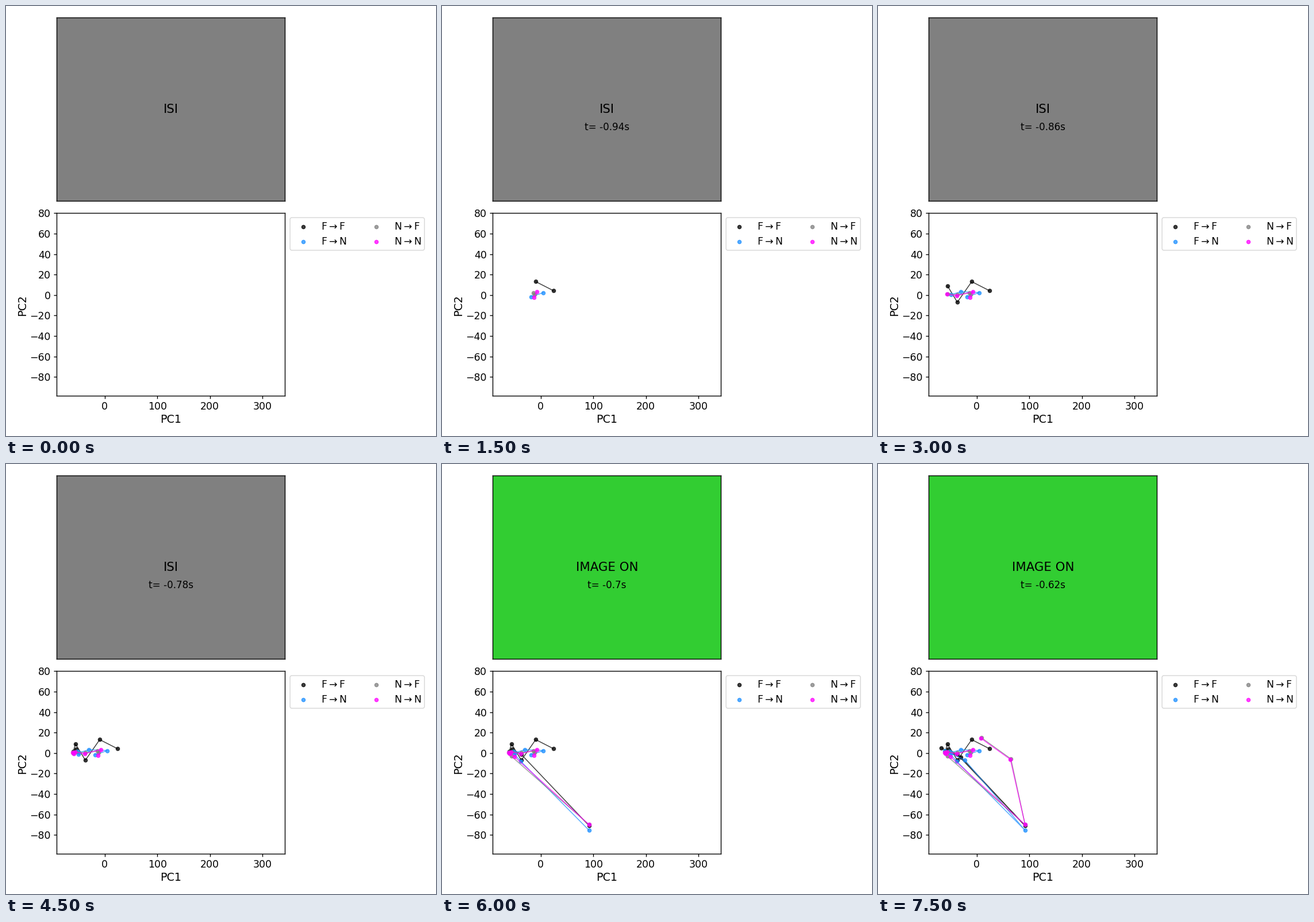
Write a matplotlib script that moves like this. It is 748 px wide and 748 px high and loops after 8000 ms.

```python
import matplotlib.pyplot as plt
import numpy as np
from matplotlib.animation import FuncAnimation
from matplotlib.patches import FancyBboxPatch

SIZE = 748
INTERVAL = 250
FRAMES = 32
HOLD = 3          # frames per time step
ONSET = 7         # step at which the image appears
ALPHA = 0.75

# Where the response goes after its peak, relative to the resting point
RETURN = {"F": [(31, -8), (-7, 1)], "N": [(126, -6.6), (70, 14)]}


def trajectory(first, start, second, rest, zigzag, pull):
    """Settle to rest in a damped zigzag, drift off, peak and return."""
    i = np.arange(5)
    late = (np.maximum(i - 2, 0) / 2) ** 2
    x = rest[0] + 24 * 0.22 ** i + pull[0] * late
    y = rest[1] + zigzag * (-0.45) ** i + pull[1] * late
    peak = (92, pull[1] - 66)
    back = np.add(rest, RETURN[first])
    return np.vstack([start, second, np.column_stack([x, y]), peak, back])


CONDITIONS = [
    ("F", "F", "black", dict(start=(24.8, 4.1), second=(-9.6, 13.1),
                             rest=(-61, 4), zigzag=-11, pull=(24, -5))),
    ("F", "N", "dodgerblue", dict(start=(-18.9, -1.8), second=(5.1, 2.4),
                                  rest=(-54, 1.3), zigzag=2, pull=(16, -9.5))),
    ("N", "F", "gray", dict(start=(-11.3, 0.5), second=(-14, 1.9),
                            rest=(-61, 0.9), zigzag=-0.7, pull=(5, -4))),
    ("N", "N", "magenta", dict(start=(-12.4, -2.6), second=(-6.9, 3.5),
                               rest=(-62, 0.4), zigzag=-1, pull=(12, -4))),
]

plt.rcParams["font.family"] = "DejaVu Sans"
# At 72 dpi one point equals one pixel
fig = plt.figure(figsize=(SIZE / 72, SIZE / 72), dpi=72, facecolor="white")


def panel(left, top, right, bottom):
    ax = fig.add_axes([left / SIZE, 1 - bottom / SIZE,
                       (right - left) / SIZE, (bottom - top) / SIZE])
    for spine in ax.spines.values():
        spine.set_linewidth(1.4)
    return ax


def label(x, y, text, size, ha="center", **kw):
    return fig.text(x / SIZE, 1 - y / SIZE, text, fontsize=size, ha=ha,
                    va="baseline", **kw)


def dots(ax, x, y, color):
    return ax.scatter(x, y, s=38, color=color, alpha=ALPHA, linewidths=1.4,
                      zorder=2)


screen = panel(88, 20, 485, 339)
screen.set(xticks=[], yticks=[])
state = label(287, 186, "", 21.3)
clock = label(287, 216, "", 16.8)

plot = panel(88, 360, 485, 678)
plot.set(xlim=(-91.7, 342.7), ylim=(-98.4, 80.2),
         xticks=range(0, 301, 100), yticks=range(-80, 81, 20))
plot.tick_params(labelsize=17.4, length=5, width=1.4, pad=5.4)
label(287, 724.8, "PC1", 19)
label(34.6, 521, "PC2", 19, rotation=90, rotation_mode="anchor")

# Legend, laid out in pixels
key = fig.add_axes([0, 0, 1, 1])
key.set(xlim=(0, SIZE), ylim=(SIZE, 0))
key.axis("off")
key.add_patch(FancyBboxPatch(
    (497.5, 371.5), 227, 50, boxstyle="round,pad=3.4,rounding_size=3.4",
    facecolor="white", edgecolor="0.8", linewidth=1.4, alpha=0.8))

traces = []
for n, (first, second, color, shape) in enumerate(CONDITIONS):
    x, y = 517.5 + 126.7 * (n // 2), 384 + 26 * (n % 2)
    dots(key, [x], [y], color)
    label(x + 30.8, y + 4.8, rf"{first}$\rightarrow${second}", 17.3, ha="left")
    line, = plot.plot([], [], color=color, alpha=ALPHA, lw=1.5, zorder=2)
    traces.append((trajectory(first, **shape), line,
                   dots(plot, [], [], color)))


def draw(frame):
    step = frame // HOLD
    on = step >= ONSET
    screen.set_facecolor("limegreen" if on else "gray")
    state.set_text("IMAGE ON" if on else "ISI")
    clock.set_text(f"t= {round(0.04 * step - 1.02, 2)}s" if step else "")
    for path, line, marks in traces:
        seen = path[:step]
        line.set_data(seen[:, 0], seen[:, 1])
        marks.set_offsets(seen)
    return []


anim = FuncAnimation(fig, draw, frames=FRAMES, interval=INTERVAL,
                     init_func=lambda: draw(0), repeat=True, repeat_delay=0)
plt.show()
```
